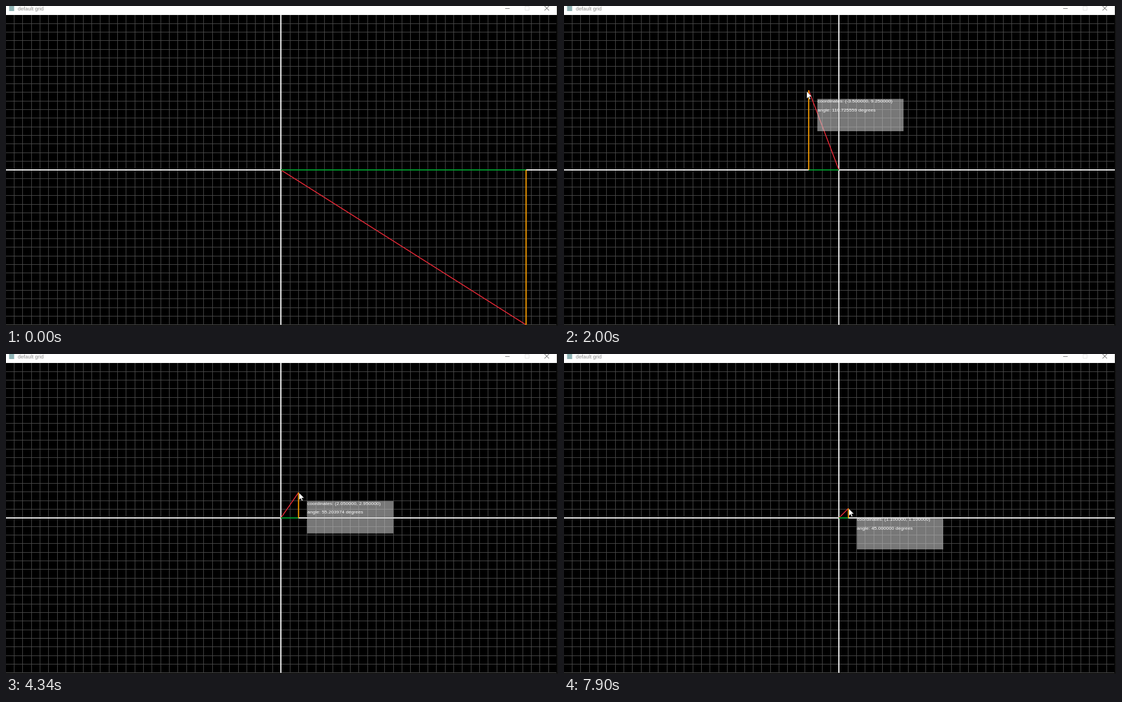
Animation, 982 px wide and 570 px high, one loop 8 s. Source, as a matplotlib script:

```python
import math
import numpy as np
import matplotlib.pyplot as plt
from matplotlib.animation import FuncAnimation
from matplotlib.collections import LineCollection
from matplotlib.patches import Polygon, Rectangle

plt.rcParams["path.snap"] = False   # keep lines exactly where they are placed

W, H, DPI = 982, 570, 100
PX = 72 / DPI                       # one pixel in points
LOOP, STEP = 8000, 20               # ms
LOOK_AHEAD = 25                     # ms the system pointer leads the drawing
UNIT = 46 / 3                       # pixels per grid unit
OX, OY = 489, 292                   # centre of the coordinate system
TOP, RIGHT, BOTTOM = 16, 980, 568

RED = (230 / 255, 41 / 255, 55 / 255)
LIME = (0, 158 / 255, 47 / 255)
ORANGE = (1, 161 / 255, 0)

# Where the pointer rests: arrival, departure, x, y
RESTS = [(0, 90, 28.45, -18), (530, 680, -3.65, -1.05), (3070, 3160, -1.4, 4.4),
         (3760, 4000, 2.75, 3.0), (4340, 4550, 2.05, 2.95), (4710, 5785, 2.1, 3.1),
         (6550, 7170, 2.0, 2.1), (7900, 8100, 1.1, 1.1)]
# Where it passes on its way: time, x, y
TURNS = [(1340, 8.6, 6.8), (1410, 8.05, 8.45), (1480, 5.5, 9.65), (1640, 2, 10),
         (2290, -6.2, 8.25), (2590, -7.45, 7.05), (2820, -6.4, 5.0),
         (3450, 1.55, 3.35)]


def pointer_path(t):
    """Monotone cubic through all stops: rests stay still, nothing overshoots."""
    keys = TURNS + [(time, x, y) for *stay, x, y in RESTS for time in stay]
    keys = np.array(sorted(keys), float)
    times, values = keys[:, 0], keys[:, 1:]
    span = np.diff(times)[:, None]
    slope = np.diff(values, axis=0) / span
    product = slope[:-1] * slope[1:]
    total = slope[:-1] + slope[1:]
    tangent = np.zeros_like(values)
    tangent[1:-1] = np.where(product > 0, 2 * product / np.where(total == 0, 1, total), 0)
    i = np.clip(np.searchsorted(times, t, side="right") - 1, 0, len(span) - 1)
    h = span[i]
    u = (t - times[i])[:, None] / h
    return (values[i] * (1 + 2 * u) * (1 - u) ** 2 + tangent[i] * h * u * (1 - u) ** 2
            + values[i + 1] * u ** 2 * (3 - 2 * u) + tangent[i + 1] * h * u ** 2 * (u - 1))


def to_pixels(x, y):
    return OX + UNIT * x, OY - UNIT * y


times = np.arange(0, LOOP, STEP) + STEP / 2
points = np.round(pointer_path(times) * 20) / 20 + 0.0
pointers = pointer_path(times + LOOK_AHEAD)

fig = plt.figure(figsize=(W / DPI, H / DPI), dpi=DPI, facecolor="#141414")
ax = fig.add_axes([0, 0, 1, 1])
ax.set_xlim(0, W)
ax.set_ylim(H, 0)
ax.axis("off")


def box(x, y, w, h, **style):
    return ax.add_patch(Rectangle((x, y), w, h, **{"lw": 0, **style}))


def line(xs, ys, color, width, z):
    return ax.plot(xs, ys, color=color, lw=width * PX, zorder=z,
                   solid_capstyle="butt")[0]


def text(x, y, string, size, color, z):
    return ax.text(x, y, string, family="Liberation Sans", size=size * PX,
                   color=color, va="baseline", zorder=z, clip_on=True)


# Title bar
box(0, 0, RIGHT, TOP, color="white")
box(5.5, 0, 9, 9, color="#8fb3b5")
text(21, 8, "default grid", 9.3, "#8c8c8c", 3)
line([888, 896], [4.5, 4.5], "#777777", 1, 2)
box(923.5, 0.5, 7, 7, fill=False, ec="#e2e2e2", lw=PX)
line([958, 966], [0, 8], "#777777", 1, 2)
line([958, 966], [8, 0], "#777777", 1, 2)

# Grid and axes
content = box(0, TOP, RIGHT, BOTTOM - TOP, color="black")
columns = [round(489.4 + UNIT * k) + 0.5 for k in range(-31, 32)]
rows = [round(291.4 + UNIT * k) + 0.5 for k in range(-17, 19)]
grid = [[(x, TOP), (x, BOTTOM)] for x in columns]
grid += [[(0, y), (RIGHT - 1, y)] for y in rows]
ax.add_collection(LineCollection(grid, colors="#4a4a4a", linewidths=PX, zorder=2))
line([OX, OX], [TOP, BOTTOM], "white", 2, 3)
line([0, RIGHT], [OY, OY], "white", 2, 3)

# Moving parts
hypotenuse = line([], [], RED, 1.6, 4)
adjacent = line([], [], LIME, 2, 5)
opposite = line([], [], ORANGE, 2, 6)
panel = box(0, 0, 10 * UNIT, 3.75 * UNIT, color=(200 / 255,) * 3, alpha=0.6, zorder=7)
coordinates, degrees = (text(0, 0, "", 8.5, "white", 8) for _ in range(2))
ARROW = 0.78 * np.array([(0, 0), (0, 16.2), (3.7, 12.7), (6.2, 18.4), (8.5, 17.4),
                         (6.1, 11.8), (11.3, 11.6)])
cursor = ax.add_patch(Polygon(ARROW, fc="white", ec="black", lw=0.3 * PX, zorder=9))
moving = [hypotenuse, adjacent, opposite, panel, coordinates, degrees, cursor]
for artist in moving:
    artist.set_clip_path(content)


def draw(i):
    x, y = points[i]
    px, py = to_pixels(x, y)
    hypotenuse.set_data([OX, px], [OY, py])
    adjacent.set_data([OX, px], [OY, OY])
    opposite.set_data([px, px], [OY, py])

    left, top = px + UNIT, py + UNIT
    baseline = top + 6.9
    panel.set_xy((left, top))
    coordinates.set_position((left, baseline))
    coordinates.set_text(f"coordinates: ({x:.6f}, {y:.6f})")
    angle = math.degrees(math.acos(x / math.hypot(x, y)))
    degrees.set_position((left, baseline + UNIT))
    degrees.set_text(f"angle: {angle:.6f} degrees")

    cursor.set_xy(ARROW + to_pixels(*pointers[i]) + np.array([1, 0.5]))
    return moving


anim = FuncAnimation(fig, draw, frames=LOOP // STEP, interval=STEP,
                     repeat=True, repeat_delay=0, blit=False)
plt.show()
```
